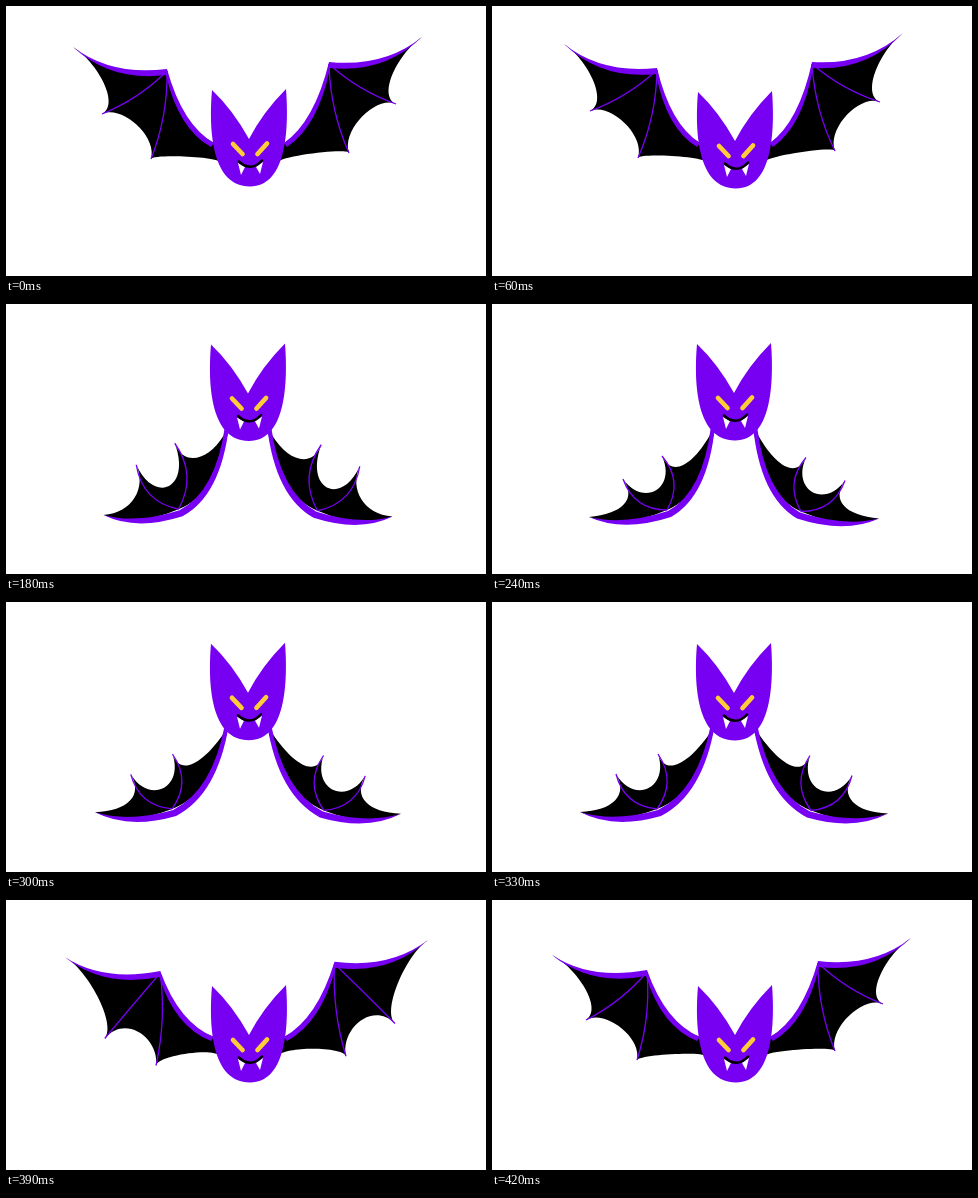
Recreate the animation shown at these times as an HTML page with a canvas. Size 480x270 px, loop 480 ms.

```html
<!DOCTYPE html>
<html>
<head>
<meta charset="utf-8">
<style>
html, body { margin: 0; overflow: hidden; background: #fff; }
canvas { display: block; }
</style>
</head>
<body>
<canvas id="stage" width="480" height="270"></canvas>
<script>
const ctx = document.getElementById('stage').getContext('2d');
const PURPLE = '#7700f2', YELLOW = '#ffcd38';

// Attachment points and arm bend for each half of the flap.
const UP = { axis: 243, shoulder: [208, 137], hip: [214, 156], lean: .35,
  bend1: [-9, 17], bend2: [-8, 18], outer: [0, -2], inner: [-1, 4],
  thick1: [0, 6], thick2: [-4, 4], thickEnd: [-3, 4] };
const DOWN = { axis: 242, shoulder: [223, 122], hip: [218, 131], lean: 0,
  bend1: [-5, 19], bend2: [17, 28], outer: [4, 7], inner: [1, 1],
  thick1: [0, -7], thick2: [-5, -4], thickEnd: [-4, 0] };

// Membrane: depth of the scallops (the middle one has two sides), bow of the two fingers.
const OPEN = [.27, .27, .27, .06, -.1, -.1];
const DRAG_UP = [.1, .72, .35, .25, .32, -.05];
const DRAG_DOWN = [.26, .9, .9, .2, -.32, .2];
const FOLDED = [.43, .62, .62, .41, -.35, .35];

// Wing points: tip, wrist, outer finger, inner finger. The right wing is given mirrored.
const poses = [
  { at: 120, half: DOWN, head: -44, shape: DRAG_DOWN, left: [99, 205, 165, 203, 128, 118, 165, 101] },
  { at: 240, half: DOWN, head: -46, shape: FOLDED, left: [97, 213, 175, 206, 131, 175, 170, 152] },
  { at: 330, half: DOWN, head: -44, shape: FOLDED, left: [88, 210, 165, 207, 124, 172, 166, 152] },
  { at: 360, half: UP, head: 0, shape: DRAG_UP,
    left: [56, 64, 152, 76, 113, 194, 165, 182], right: [55, 46, 150, 66, 103, 182, 155, 172] },
  { at: 420, half: UP, head: 0, shape: OPEN,
    left: [60, 55, 155, 72, 94, 120, 145, 160], right: [67, 38, 160, 63, 95, 104, 143, 151] },
  { at: 480, half: UP, head: -2, shape: OPEN,
    left: [67, 41, 161, 65, 96, 108, 145, 153], right: [70, 31, 163, 58, 96, 98, 143, 147] },
  { at: 540, half: UP, head: 0, shape: OPEN,
    left: [72, 38, 165, 64, 98, 105, 146, 152], right: [75, 27, 166, 58, 98, 96, 143, 145] }
];
for (const p of poses) p.right ??= p.left.map((v, i) => v + i % 2 * 1.5);

const mix = (a, b, u) => a + (b - a) * u;
const lerp = (a, b, u) => a.map((v, i) => mix(v, b[i], u));
const add = (a, b, k = 1) => [a[0] + b[0] * k, a[1] + b[1] * k];
const move = p => ctx.moveTo(...p);
const line = p => ctx.lineTo(...p);
const quad = (c, p) => ctx.quadraticCurveTo(...c, ...p);
const cubic = (c, d, p) => ctx.bezierCurveTo(...c, ...d, ...p);

function fill(color, draw) {
  ctx.beginPath();
  draw();
  ctx.closePath();
  ctx.fillStyle = color;
  ctx.fill();
}

function stroke(color, width, draw) {
  ctx.beginPath();
  draw();
  ctx.strokeStyle = color;
  ctx.lineWidth = width;
  ctx.stroke();
}

function wing(v, shape, half) {
  const [tip, wrist, f1, f2] = [0, 2, 4, 6].map(i => v.slice(i, i + 2));
  const [k1, k2, k3, k4, bow1, bow2] = shape;
  const { shoulder, hip } = half;
  const bowOf = (f, b) => [(wrist[1] - f[1]) * b, (f[0] - wrist[0]) * b];
  const o1 = bowOf(f1, bow1), o2 = bowOf(f2, bow2);
  const toward = (f, o, k) => add(lerp(f, wrist, k), o, k);
  const arm1 = add(lerp(tip, wrist, .5), half.bend1);
  const arm2 = add(lerp(wrist, shoulder, .5), half.bend2);
  const outer = add(wrist, half.outer), inner = add(wrist, half.inner);

  fill('#000', () => {
    move(tip);
    cubic(lerp(tip, lerp(wrist, f2, half.lean), k1), toward(f1, o1, k1), f1);
    cubic(toward(f1, o1, k2), toward(f2, o2, k3), f2);
    cubic(toward(f2, o2, k4), lerp(hip, wrist, k4), hip);
    line(shoulder);
    quad(add(arm2, half.thick2, .5), wrist);
    quad(add(arm1, half.thick1, .5), tip);
  });
  for (const [f, o] of [[f1, o1], [f2, o2]])
    stroke(PURPLE, 1.3, () => { move(wrist); quad(add(lerp(wrist, f, .5), o), f); });
  fill(PURPLE, () => {
    move(tip);
    quad(arm1, outer);
    quad(arm2, shoulder);
    line(add(shoulder, half.thickEnd));
    quad(add(arm2, half.thick2), inner);
    quad(add(arm1, half.thick1), tip);
  });
}

function head() {
  fill(PURPLE, () => {
    move([206, 86]);
    quad([227, 106], [243, 135]);
    quad([257, 108], [280, 85]);
    cubic([283, 124], [281, 182.5], [244, 182.5]);
    cubic([206, 182.5], [202.5, 127], [206, 86]);
  });
  ctx.lineCap = 'round';
  stroke(YELLOW, 4.7, () => {
    move([227, 140]); line([236.5, 150]);
    move([261, 139.5]); line([251.5, 150]);
  });
  fill('#fff', () => { move([232, 159]); line([239, 163]); line([235, 171]); });
  fill('#fff', () => { move([257, 158]); line([250, 163]); line([254, 170]); });
  stroke('#000', 2.5, () => { move([233, 157.5]); quad([245, 168.5], [256, 156.5]); });
  ctx.lineCap = 'butt';
}

// Steps of 30 ms during the stroke, 60 ms while the wings are raised.
function stepTime(ms) {
  const t = ms % 480, step = t < 120 || t >= 420 ? 60 : 30;
  const s = Math.floor(t / step) * step;
  return s < 120 ? s + 480 : s;
}

function render(now) {
  const t = stepTime(now);
  const i = poses.findLastIndex(p => p.at <= t);
  const a = poses[i], next = poses[i + 1];
  const b = next && next.half === a.half ? next : a;
  const x = b === a ? 0 : (t - a.at) / (b.at - a.at);
  const u = 1 - (1 - x) ** 2;
  const shape = lerp(a.shape, b.shape, u), { axis } = a.half;

  ctx.fillStyle = '#fff';
  ctx.fillRect(0, 0, 480, 270);
  wing(lerp(a.left, b.left, u), shape, a.half);
  ctx.save();
  ctx.translate(2 * axis, 0);
  ctx.scale(-1, 1);
  wing(lerp(a.right, b.right, u), shape, a.half);
  ctx.restore();
  ctx.save();
  ctx.translate(axis - 243, mix(a.head, b.head, u));
  head();
  ctx.restore();
}

let start;
function tick(now) {
  start ??= now;
  render(now - start);
  requestAnimationFrame(tick);
}
render(0);
requestAnimationFrame(tick);
</script>
</body>
</html>
```
